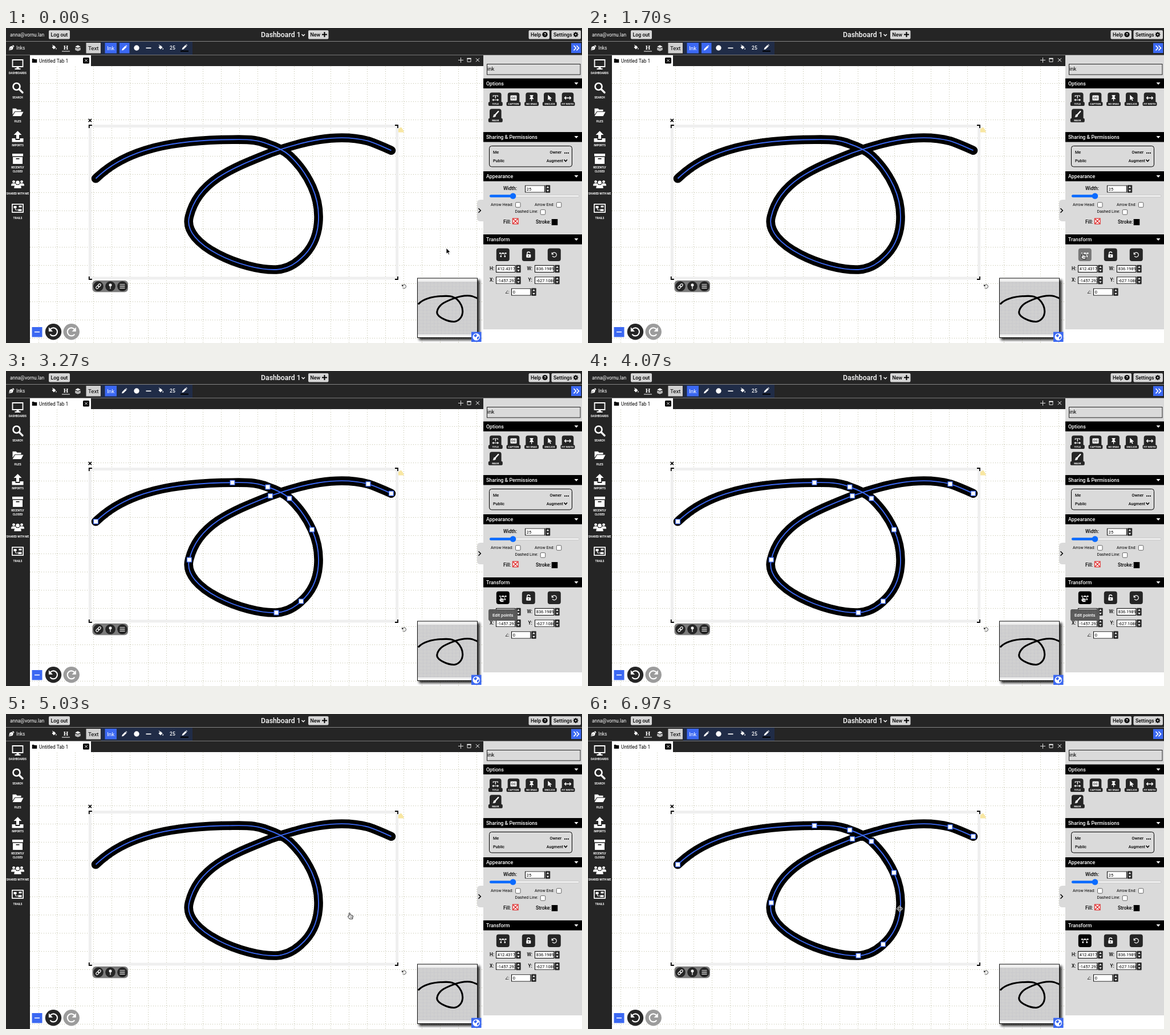
These frames come from a looping animation (1010 px wide and 554 px high, 7.01 s). An HTML page:

```html
<!DOCTYPE html>
<html lang="en">
<head>
<meta charset="utf-8">
<title>Ink editing</title>
<style>
html, body { margin: 0; width: 100%; height: 100%; overflow: hidden; background: #fff; }
svg { display: block; width: 100vw; height: 100vh; font-family: Roboto, Arial, sans-serif; }
</style>
</head>
<body>
<svg id="stage" viewBox="0 0 1010 554"></svg>
<script>
const DARK = '#252525', BLUE = '#3b68f2', PANEL = '#dadada', LIGHT = '#d6d6d6';
const LOOP = 7010;
const INK = 'M157.5 264.8C213 210 300 197 397 196.3C430 195.5 445 198 459 204C474 209 486 214 497 224' +
  'C513 239 527 258 536.5 279C553 316 556 371 517.5 405C505 417 490 424 474 425' +
  'C418 427 308 382 321.3 332C336 270 395 247 463.5 219.7C520 199.5 580 184.5 635 198.7C649 203 662 209.5 675.5 215.3';
const KNOTS = [[157.5, 264.8], [397, 196.3], [459, 204], [497, 224], [536.5, 279], [517.5, 405],
  [474, 425], [321.3, 332], [463.5, 219.7], [635, 198.7], [675.5, 215.3]];

// Shape helpers
const rect = (x, y, w, h, fill, r = 0, more = '') =>
  `<rect x="${x}" y="${y}" width="${w}" height="${h}" fill="${fill}" rx="${r}" ${more}/>`;
const text = (x, y, s, size, fill = '#000', more = '') =>
  `<text x="${x}" y="${y}" font-size="${size}" fill="${fill}" ${more}>${s}</text>`;
const line = (d, color = '#fff', w = 1.3, more = '') =>
  `<path d="${d}" fill="none" stroke="${color}" stroke-width="${w}" ${more}/>`;
const fill = (d, color = '#fff') => `<path d="${d}" fill="${color}"/>`;
const dot = (x, y, r, color = '#fff', more = '') => `<circle cx="${x}" cy="${y}" r="${r}" fill="${color}" ${more}/>`;
const at = (x, y, body, scale = 1) => `<g transform="translate(${x} ${y}) scale(${scale})">${body}</g>`;
const group = (id, body) => `<g id="${id}">${body}</g>`;
const MID = ' text-anchor="middle"', END = ' text-anchor="end"';
const BOLD = ' font-weight="700"', MED = ' font-weight="500"', ROUND = 'stroke-linecap="round"';

// Icons, centred on 0,0
const pen = (c = '#fff') => fill('M-5 5L-4 1.8L2 -4.2L4.4 -1.8L-1.6 4.2ZM2.7 -4.9L3.7 -5.6L5.5 -3.7L5 -2.5Z', c);
const bucket = fill('M-4 0L0 -4L4 0L0 4ZM-3.6 -4.6L-2.8 -5.2L1 -1.4L.2 -.6ZM4.6 1Q6.6 4 4.6 4.3Q2.8 4 4.6 1Z');
const cross = (s, c, w) => line(`M${-s} ${-s}L${s} ${s}M${s} ${-s}L${-s} ${s}`, c, w);
const folder = c => fill('M-5 -4H-1L0 -2.8H5V4H-5Z', c);
const turn = (c, w = 1.4) => line('M-3.4 -2A4 4 0 1 1 -3.2 2.5', c, w) + fill('M-4.6 -4.5V-.3H-.5Z', c);
const person = (x, y, s) => at(x, y, dot(0, -3, 2.6) + fill('M-5 5Q-5 .4 -2 .4H2Q5 .4 5 5Z'), s);
const nodes = line('M-3.5 3Q-3.5 -2.5 0 -2.5Q3.5 -2.5 3.5 3M-5 -2.5H5', '#fff', .9) +
  [[-5, -2.5], [0, -2.5], [5, -2.5], [-3.5, 3], [3.5, 3]].map(([x, y]) => rect(x - 1.2, y - 1.2, 2.4, 2.4, '#fff')).join('');

function grid() {
  let d = '';
  for (let x = 57; x < 837; x += 32) d += `M${x}.5 68V554`;
  for (let y = 97; y < 554; y += 32) d += `M42 ${y}.5H837`;
  return line(d, '#bdbda2', 1, 'stroke-dasharray="1 3"');
}

function topBars() {
  const button = (x, w, s) => rect(x, 4, w, 15.5, LIGHT, 2) + text(x + 3.5, 15, s, 8.8, '#000', MED);
  const gear = dot(999, 11.5, 3.1, '#000') +
    line('M999 7V16M994.5 11.5H1003.5M995.8 8.3L1002.2 14.7M1002.2 8.3L995.8 14.7', '#000', 1.7) + dot(999, 11.5, 1.3, LIGHT);
  return rect(0, 0, 1010, 48, DARK) + rect(0, 23, 1010, 1, '#858585') + rect(0, 47, 1010, 1, '#777') +
    text(7, 15, 'anna@vornu.lan', 8.4, '#fff') + button(75, 37, 'Log out') +
    text(447, 16, 'Dashboard 1', 12.3, '#fff', MED) + line('M518.5 11L521.3 13.8L524 11', '#fff', 1.4) +
    button(530, 35.5, 'New') + line('M554 11.5H563M558.5 7V16', '#000', 2) +
    button(916.5, 36.5, 'Help') + dot(945, 11.5, 4.6, '#000') + text(945, 14.3, '?', 7.5, '#fff', MID + BOLD) +
    button(956.5, 51.5, 'Settings') + gear +
    at(9.5, 35, fill('M-4.5 4.5L-3 -2L1 -3.5L3.5 -1L2 3ZM1.5 -4L3 -5L5 -3L4 -1.5Z') + line('M-4 4L0 0', DARK, .8)) +
    text(18, 38, 'Inks', 8.3, '#fff') +
    at(84, 34, bucket, .85) + text(105, 38, 'H', 11, '#fff', MID + BOLD + ' font-family="Liberation Serif, serif"') + rect(98, 40.3, 14, 1.2, '#ddd') +
    at(126, 35, fill('M-5 -2.5L0 -5L5 -2.5L0 0Z') + line('M-5 .3L0 2.6L5 .3M-5 2.8L0 5L5 2.8', '#fff', 1.4), .95) +
    rect(167, 24, 160, 23, '#202c47') +
    rect(140.5, 26, 25.5, 18.5, '#d0d0d0') + text(153.2, 39, 'Text', 9.8, '#000', MID) +
    rect(173.5, 26, 20.5, 18.5, BLUE) + text(183.7, 39, 'Ink', 9.8, '#fff', MID) +
    rect(199, 26, 17.5, 18.5, BLUE, 0, 'id="penBox"') + at(207.5, 35, pen(), .9) +
    dot(229, 35, 4.7) + rect(245.5, 34.4, 9, 1.7, '#fff') + at(271, 34, bucket, .9) +
    text(292, 38, '25', 8.6, '#fff', MID + MED) + at(313, 33.5, pen(), .9) + rect(306, 39.7, 14, 2, '#000') +
    rect(991, 26.5, 17.5, 17.5, BLUE) + line('M995.5 31L999.5 35.2L995.5 39.4M1000.5 31L1004.5 35.2L1000.5 39.4', '#fff', 1.6);
}

function sidebar() {
  const label = (y, s) => text(20.5, y, s, 4.75, '#fff', MID + BOLD);
  return rect(0, 48, 42, 506, DARK) +
    at(20.5, 64, line('M-9 -8H9V4H-9Z', '#fff', 1.8) + rect(-2, 4, 4, 4, '#fff') + rect(-5, 7, 10, 2, '#fff')) + label(81.3, 'DASHBOARDS') +
    at(20.5, 105, dot(-2, -2, 6, 'none', 'stroke="#fff" stroke-width="2.6"') + line('M2.5 2.5L8.5 8.5', '#fff', 3.2, ROUND)) + label(123.5, 'SEARCH') +
    at(20.5, 148.5, fill('M-9 -7H-3L-1 -5H6V-2H-5L-9 4ZM-4.5 -1H10L6 6.5H-9Z')) + label(165.7, 'FILES') +
    at(20.5, 191, fill('M0 -10L7 -3H2.5V4H-2.5V-3H-7ZM-10 3H-4V6H4V3H10V9.5H-10Z')) + label(208.4, 'IMPORTS') +
    at(20.5, 230, fill('M-9.5 -9H9.5V-4.5H-9.5ZM-8.5 -3H8.5V9H-8.5Z') + rect(-3, -1, 6, 1.8, DARK)) + label(246.7, 'RECENTLY') + label(253.7, 'CLOSED') +
    person(13.5, 273, .9) + person(27.5, 273, .9) + person(20.5, 275.5, 1.25) + label(292.7, 'SHARED WITH ME') +
    at(20.5, 317, rect(-10.5, -8, 21, 16, '#fff', 1) + rect(-8.8, -6.3, 17.6, 12.6, DARK) + rect(-7, -4, 5, 4, '#fff') +
      rect(2, -4.5, 5, 3, '#fff') + rect(1, 1.5, 6, 3.5, '#fff') + line('M-4 0V3H1', '#fff', 1)) + label(335.7, 'TRAILS');
}

function tabs() {
  return rect(42, 48, 795, 19, DARK) + rect(42, 48, 107, 20, '#fff') + at(50, 57.5, folder('#000'), .85) +
    text(58, 60.5, 'Untitled Tab 1', 8.4) + rect(135, 52, 11, 10.5, '#000', 1.5) + at(140.5, 57.2, cross(2.3, '#fff', 1)) +
    line('M793 56.5H802M797.5 52V61M809 53.5H815V59.5H809Z', '#ddd', 1) + rect(808.5, 52.8, 7, 1.8, '#fff') + at(827, 56.3, cross(3, '#fff', 1));
}

function selection() {
  const corner = (x, y, sx, sy) => line(`M${x + sx * 5} ${y}H${x}V${y + sy * 5}`, '#000', 1.8);
  return line('M147.3 172.5H685.7V440H147.3Z', '#efefef', 5) +
    corner(145.8, 171, 1, 1) + corner(687, 171, -1, 1) + corner(145.8, 442, 1, -1) + corner(687, 442, -1, -1) +
    at(147.3, 162.5, cross(2.6, '#000', 1.6)) + fill('M688 183.5V177.5L691 175.5L693 174.5L696 178.5L698 183.5Z', '#f8e7a2') +
    at(698, 454.5, turn('#222', 1), .85) +
    line(INK, '#000', 15.6, ROUND) + line(INK, BLUE, 1.9) +
    group('knots', KNOTS.map(([x, y]) => rect(x - 4, y - 4, 8, 8, '#fff', 0, `stroke="${BLUE}" stroke-width="1.2"`)).join(''));
}

function floating() {
  const ring = x => rect(x, -1.9, 5.6, 3.8, 'none', 1.9, 'stroke="#fff" stroke-width="1.2"');
  return rect(151.5, 444, 62.5, 20.5, '#7b7b7b', 6) + [162, 183, 204].map(x => dot(x, 454.2, 8.8, DARK)).join('') +
    at(162, 454.2, `<g transform="rotate(-45)">${ring(-5.2)}${ring(-.4)}</g>`) +
    dot(183, 452, 2.5) + rect(182.4, 454, 1.2, 5, '#fff') + line('M199.5 451H208.5M199.5 454.2H208.5M199.5 457.4H208.5', '#fff', 1.2) +
    rect(45.5, 526, 18, 17.5, BLUE) + rect(50, 533.8, 9, 1.6, '#fff') +
    dot(83, 534.2, 14.2, DARK) + at(83, 534.2, turn('#fff', 1.2), 1.75) +
    dot(114.7, 534.2, 14.2, '#9c9c9c') + `<g transform="translate(114.7 534.2) scale(-1.75 1.75)">${turn('#fff', 1.2)}</g>`;
}

function minimap() {
  let d = '';
  for (let i = 0; i < 16; i++) d += `M${725 + i * 6.4} 447V538M722 ${449 + i * 5.9}H826`;
  return rect(724, 443, 107, 106, '#000', 0, 'filter="url(#blur)" opacity=".8"') +
    rect(721, 439.5, 106, 105.5, '#111') + rect(722, 440.5, 104, 103.5, '#f0f0f0') + rect(722, 446, 104, 93, '#d0d0d0') +
    line(d, '#bcbcc6', .7, 'stroke-dasharray="1 1.5"') +
    `<g clip-path="url(#mini)">${at(692.7, 432.7, line(INK, '#000', 15.6, ROUND), .197)}</g>` +
    rect(816, 534.5, 17.5, 17.5, BLUE) + dot(824.7, 543.2, 6.3) + fill('M820 541L824 538L826 541L823 544ZM826 544L830 542L829 546L826 548Z', BLUE);
}

function panel() {
  const header = (y, s) => rect(837, y, 173, 17.5, '#000') + text(842, y + 12.2, s, 8.85, '#fff', MED) + fill(`M996.5 ${y + 7}H1003.5L1000 ${y + 11}Z`);
  const option = (x, y, s, icon) => rect(x - 10.3, y - 11.5, 20.6, 20, DARK, 4) + rect(x - 12.5, y + 5, 25, 7, DARK, 2) +
    at(x, y - 2, icon) + text(x, y + 10.3, s, 4.4, '#fff', MID + BOLD);
  const spinner = (x, y) => rect(x, y, 8.5, 13.5, '#2b2b2b', 1) + fill(`M${x + 2.1} ${y + 5}H${x + 6.5}L${x + 4.3} ${y + 2}ZM${x + 2.1} ${y + 8.5}H${x + 6.5}L${x + 4.3} ${y + 11.5}Z`);
  const field = (x, y, s, w = 34.5) => `<svg x="${x}" y="${y}" width="${w}" height="13">` +
    rect(.5, .5, w - 1, 12, '#fff', 0, 'stroke="#000"') + text(2.8, 9.4, s, 7.4) + rect(w - 1, 0, 1, 13, '#000') + '</svg>' + spinner(x + w + .7, y - .3);
  const check = (x, y) => rect(x, y, 8.5, 8.5, '#fff', 1.5, 'stroke="#555" stroke-width=".9"');
  const wide = line('M-5 0H5M-3 -2.5L-5.5 0L-3 2.5M3 -2.5L5.5 0L3 2.5');
  const button = (x, icon, id = '') => rect(x - 11.5, 387.5, 23, 22.5, DARK, 4, id) + at(x, 398.7, icon);
  return rect(837, 48, 173, 482, PANEL) + rect(837, 530, 173, 24, '#fff') +
    rect(837, 48, 173, 0.01, DARK) +
    fill('M837 302H832Q826 302 826 308V334Q826 340 832 340H837Z', PANEL) + line('M828.5 317.3L832.3 321L828.5 324.7', '#000', 1.5) +
    rect(843.5, 63.5, 163.5, 18.5, PANEL, 0, 'stroke="#222" stroke-width="1"') + text(844, 74.8, 'ink', 9.4) +
    header(88.7, 'Options') + header(183, 'Sharing &amp; Permissions') + header(252, 'Appearance') + header(363, 'Transform') +
    option(858.3, 125, 'TITLE', line('M-4 -2V-4H4V-2M0 -4V1M-5 3.5H5M-3 2L-5 3.5L-3 5M3 2L5 3.5L3 5', '#fff', 1.2)) +
    option(890, 125, 'CAPTION', rect(-5.5, -4.5, 11, 9, '#fff', 1) + text(0, 2.4, 'CC', 6, DARK, MID + BOLD)) +
    option(921.6, 125, 'NO DRAG', fill('M-3 -5H3V-3.5H2V-.5L4 2H-4L-2 -.5V-3.5H-3ZM-.6 2H.6V5.5H-.6Z')) +
    option(953.3, 125, 'ONCLICK', fill('M-3 -5.5L4 1.3H.8L2.4 4.5L.8 5.2L-.7 2L-3 4Z')) +
    option(985, 125, 'FIT WIDTH', wide) +
    option(858.3, 153.8, 'MASK', line('M5 -5L0 .5', '#fff', 2.4, ROUND) + fill('M-1.5 0L1 2.2Q0 5.5 -5 5Q-3.5 4 -3.5 2Q-3 0 -1.5 0Z')) +
    rect(847.5, 207.5, 145, 36.5, 'none', 4, 'stroke="#000" stroke-width="1"') +
    text(854, 221, 'Me', 7.2, '#000', MED) + text(974, 221, 'Owner', 7.1, '#000', END + MED) +
    [980, 983, 986].map(x => dot(x, 219.8, 1.1, '#000')).join('') +
    text(854, 235.7, 'Public', 7.2, '#000', MED) + text(977, 235.7, 'Augment', 7.2, '#000', END + MED) + line('M978.5 231.5L981.3 234.5L984 231.5', '#000', 1.6) +
    text(872, 285, 'Width:', 8.4, '#000', MED) + field(910, 276.5, '25', 35) +
    rect(848, 293.5, 157, 4, '#eee', 2, 'stroke="#bbb" stroke-width=".6"') + rect(848, 293.2, 41, 4.6, '#0a6bff', 2.3) + dot(889, 295.5, 5.3, '#0a6bff') +
    text(850, 312.8, 'Arrow Head:', 7.1) + check(893.5, 306.8) + text(927, 312.8, 'Arrow End:', 7.1) + check(965.3, 306.8) +
    text(892.5, 325.4, 'Dashed Line:', 7.1) + check(937.2, 319.6) +
    text(872, 344, 'Fill:', 8.4, '#000', MED) + rect(888.5, 335, 9.6, 9.6, '#fff', 0, 'stroke="#d33" stroke-width="1.3"') + at(893.3, 339.8, cross(4, '#d22', 1.3)) +
    text(929, 344, 'Stroke:', 8.4, '#000', MED) + rect(956.7, 336, 10.6, 10.8, '#000') +
    button(871.3, nodes, 'id="editBox"') +
    button(916.3, rect(-4, -.7, 8, 5.7, '#fff', 1) + line('M-2.4 0V-2.5A2.4 2.4 0 0 1 2.4 -2.7', '#fff', 1.4) + dot(0, 2, 1, DARK)) +
    button(961.3, turn('#fff', 1.2)) +
    text(848, 425.5, 'H:', 8.3, '#000', MED) + field(859, 417, '412.4317') + text(913.5, 425.5, 'W:', 8.3, '#000', MED) + field(927, 417, '836.1989') +
    text(848, 446, 'X:', 8.3, '#000', MED) + field(859, 437.3, '-1457.292') + text(915.5, 446, 'Y:', 8.3, '#000', MED) + field(927, 437.3, '-627.1080') +
    line('M880 461.5L876 466.5H880.5', '#222', .8) + text(880.5, 466.7, ':', 8) + field(886, 457.7, '0') +
    group('tip', rect(846, 419, 51, 20.3, '#585858', 3, 'opacity=".96"') + text(871.3, 432, 'Edit points', 7.7, '#fff', MID + MED));
}

const OUTLINE = 'stroke="#000" stroke-width=".9" stroke-linejoin="round"';
const cursors =
  group('arrow', '<path d="M0 0V10.2L2.3 8.1L4 11.6L5.6 10.9L4 7.4H7.2Z" fill="#000" stroke="#fff" stroke-width=".8"/>') +
  group('point', `<path d="M-2.6 .5V-4.6Q-1.6 -6 -.6 -4.6V-1.4L3 -.9Q4.6 -.5 4.5 1L3.8 3.4V5.4H-1.6L-4.6 1.4Q-4.4 -.3 -2.6 .5Z" fill="#fff" ${OUTLINE}/>` + line('M-.3 1.2V3.4M1.2 1.2V3.4M2.6 1.2V3.4', '#000', .6)) +
  group('grab', `<path d="M-2 0L-3.6 -3.4Q-3 -4.8 -2 -3.6L-1.2 -1.8L-1.4 -4.6Q-.4 -5.8 .4 -4.6L.6 -2L1.4 -4.6Q2.6 -5.2 2.9 -4L2.6 -1.6L3.8 -3Q5 -3 4.7 -1.8L3.4 3V5.2H-1.8L-4.8 1.2Q-4.4 -.4 -2 1.2Z" fill="#fff" ${OUTLINE}/>`) +
  group('move', '<path d="M0 -5.6L2.2 -3H.8V-.8H3V-2.2L5.6 0L3 2.2V.8H.8V3H2.2L0 5.6L-2.2 3H-.8V.8H-3V2.2L-5.6 0L-3 -2.2V-.8H-.8V-3H-2.2Z" fill="#000" stroke="#fff" stroke-width=".9"/>');

const $ = id => document.getElementById(id);
$('stage').innerHTML = '<defs><filter id="blur"><feGaussianBlur stdDeviation="2"/></filter>' +
  '<clipPath id="mini"><rect x="722" y="441" width="104" height="103"/></clipPath></defs>' +
  rect(0, 0, 1010, 554, '#fff') + grid() + selection() + floating() + minimap() + tabs() + topBars() + sidebar() + panel() + group('cursor', cursors);

// Pointer path: time, x, y
const PATH = [[0, 772, 387], [250, 772, 387], [1050, 868, 396], [1250, 868, 396], [1450, 869, 401], [4350, 869, 401],
  [4950, 604, 355], [5100, 604, 355], [5600, 545.5, 341.5], [6300, 545.5, 341.5], [6400, 546.5, 342.5], [LOOP, 546.5, 342.5]];
const show = (id, on) => $(id).setAttribute('visibility', on ? 'visible' : 'hidden');

function draw(t) {
  const i = PATH.findIndex(k => k[0] > t), [t0, x0, y0] = PATH[i - 1], [t1, x1, y1] = PATH[i];
  const u = (t - t0) / (t1 - t0), e = u * u * (3 - 2 * u);
  $('cursor').setAttribute('transform', `translate(${x0 + (x1 - x0) * e} ${y0 + (y1 - y0) * e})`);
  const shape = t < 1250 ? 'arrow' : t < 5400 ? 'point' : t < 6400 ? 'grab' : 'move';
  for (const id of ['arrow', 'point', 'grab', 'move']) show(id, id === shape);
  const editing = t >= 3000 && t < 4300 || t >= 6400;
  show('knots', editing);
  show('penBox', t < 3000);
  show('tip', t >= 1900 && t < 4450);
  $('editBox').setAttribute('fill', editing ? '#000' : t >= 1250 && t < 4450 ? '#777' : DARK);
}

const start = performance.now();
function tick() {
  draw((performance.now() - start) % LOOP);
  requestAnimationFrame(tick);
}
tick();
</script>
</body>
</html>
```
